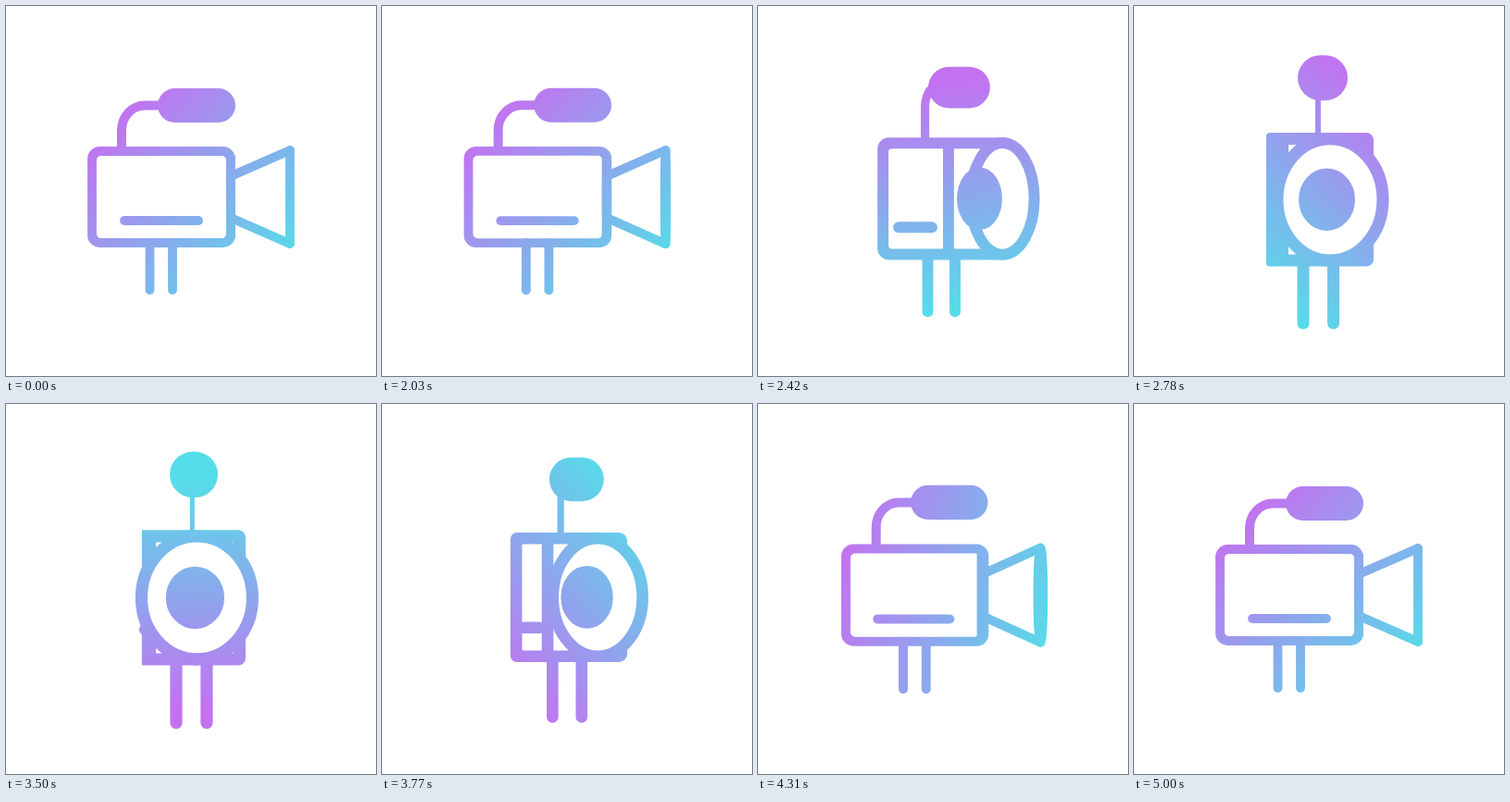
An HTML page with a canvas that plays this animation: 400 px wide and 400 px high, repeating every 5.06 s.

```html
<!DOCTYPE html>
<html lang="en">
<head>
<meta charset="utf-8">
<title>Camera turn</title>
<style>
html, body { margin: 0; width: 100%; height: 100%; overflow: hidden; background: #fff; }
canvas { display: block; width: 100vw; height: 100vh; }
</style>
</head>
<body>
<canvas id="stage" width="400" height="400"></canvas>
<script>
const ctx = document.getElementById('stage').getContext('2d');
const LOOP = 5060, START = 2030, END = 5000, STEP = 30;
const STROKE = 9.8, HALF = 49.5;

// [time, value] keys, joined by a smooth curve
const TURN = [[2000, 0], [2200, .24], [2420, .61], [2540, .756], [2780, .936], [3195, 1.09],
  [3500, .98], [3620, .912], [3980, .61], [4160, .21], [4330, .02], [4500, -.03], [4700, -.033], [5000, 0]];
const ANGLE = [[2000, 45], [2420, 82], [2780, 130], [3500, 272], [3980, 345], [5000, 405]];
const SHIFT = [[3500, 0], [3980, 2], [4400, 0]];

// Geometry at several amounts of turn, relative to the body centre
const POSES = [0, .61, .936, .98, 1.09];
const GEO = {
  back: [-107, -53.4, -38, -34.6, -34.6],
  front: [43, 4.9, -29.7, -33, -34],
  right: [43, 54, 39.5, 39, 39],
  leftR: [13, 10, 3, 0, 0],
  rightR: [13, 9, 6, 6, 6],
  innerR: [5, 3, 0, 0, 0],
  ringX: [107, 52.9, 9, 4.8, -2.5],
  ringRx: [0, 28.3, 42.9, 44.6, 45.2],
  ringRy: [50.5, 49.7, 49.4, 49.4, 49.4],
  discX: [43, 32.5, 6.4, 3.3, -1],
  discRx: [0, 15.2, 18, 18.6, 19],
  discRy: [22.5, 23, 20.5, 20.2, 20.2],
  footA: [-44.5, -13.6, -12.8, -11.9, -11.9],
  footB: [-20, 10.7, 11.7, 12.6, 12.6],
  stemX: [-75, -16, -.8, 1, 1],
  stemW: [10, 7.5, 4.5, 3.7, 3.7],
  bendX: [25, 9, 0, 0, 0],
  bendY: [27, 18, 0, 0, 0],
  micL: [-36, -13.1, -17.3, -17.1, -17.1],
  micR: [48, 41.9, 23.3, 21.6, 21.6],
  lineA: [-72, -39.4, -37, -36.8, -36],
  lineB: [8, -9.9, -32, -33, -34]
};

const clamp = (v, lo, hi) => Math.min(hi, Math.max(lo, v));

function spline(keys, t) {
  const n = keys.length - 1;
  if (t <= keys[0][0]) return keys[0][1];
  if (t >= keys[n][0]) return keys[n][1];
  let i = 0;
  while (t >= keys[i + 1][0]) i++;
  const slope = k => (keys[k + 1][1] - keys[k][1]) / (keys[k + 1][0] - keys[k][0]);
  const tangent = k => k === 0 || k === n ? 0 : (slope(k - 1) + slope(k)) / 2;
  const [t0, a] = keys[i], [t1, b] = keys[i + 1];
  const d = t1 - t0, u = (t - t0) / d, w = u * u * (3 - 2 * u);
  return a + (b - a) * w + d * u * (1 - u) * ((1 - u) * tangent(i) - u * tangent(i + 1));
}

function pose(p) {
  let i = 0;
  while (i < POSES.length - 2 && p > POSES[i + 1]) i++;
  const u = (p - POSES[i]) / (POSES[i + 1] - POSES[i]);
  const g = {};
  for (const name in GEO) {
    const v = GEO[name];
    g[name] = v[i] + (v[i + 1] - v[i]) * u;
  }
  if (p > 0 && p < .61) g.ringRx += 6.9 * Math.sin(Math.PI * p / .61);
  g.ringX = Math.min(g.ringX, 107);
  for (const name of ['ringRx', 'discRx']) g[name] = Math.max(.01, g[name]);
  for (const name of ['leftR', 'rightR', 'innerR', 'bendX', 'bendY']) g[name] = Math.max(0, g[name]);
  return g;
}

function line(x0, y0, x1, y1, cap = 'round') {
  ctx.lineCap = cap;
  ctx.beginPath();
  ctx.moveTo(x0, y0);
  ctx.lineTo(x1, y1);
  ctx.stroke();
}

function oval(x, rx, ry, fill) {
  ctx.beginPath();
  ctx.ellipse(x, 0, rx, ry, 0, 0, Math.PI * 2);
  ctx.closePath();
  ctx.fillStyle = fill;
  ctx.fill();
  ctx.stroke();
}

function gradient(deg, ox, oy, s) {
  const a = deg * Math.PI / 180, r = 125 / s;
  const x = (204 - ox) / s, y = (206 - oy) / s;
  const dx = r * Math.cos(a), dy = r * Math.sin(a);
  const g = ctx.createLinearGradient(x - dx, y - dy, x + dx, y + dy);
  g.addColorStop(0, '#c471f0');
  g.addColorStop(1, '#55dde9');
  return g;
}

function drawMic(g, paint) {
  const y = -99, r = 18.4;
  ctx.lineWidth = g.stemW;
  ctx.lineCap = 'butt';
  ctx.beginPath();
  ctx.moveTo(g.stemX, -HALF);
  ctx.lineTo(g.stemX, y + g.bendY);
  ctx.bezierCurveTo(g.stemX, y + g.bendY * .45, g.stemX + g.bendX * .45, y, g.stemX + g.bendX, y);
  ctx.lineTo(Math.max(g.micL + 5, g.stemX + g.bendX), y);
  ctx.stroke();
  ctx.fillStyle = paint;
  ctx.beginPath();
  ctx.roundRect(g.micL, y - r, g.micR - g.micL, 2 * r, r);
  ctx.fill();
}

function drawBody(g, paint) {
  const h = STROKE / 2, w = g.right - g.back;
  ctx.fillStyle = paint;
  ctx.beginPath();
  ctx.roundRect(g.back - h, -HALF - h, w + 2 * h, 2 * (HALF + h), [g.leftR, g.rightR, g.rightR, g.leftR]);
  ctx.roundRect(g.back + h, -HALF + h, w - 2 * h, 2 * (HALF - h), g.innerR);
  ctx.fill('evenodd');
  line(g.front, -45, g.front, 45, 'butt');
  line(g.lineA, 25.5, g.lineB, 25.5);
  for (const x of [g.footA, g.footB]) line(x, HALF, x, 100.5);
}

function drawLens(g, paint) {
  for (const side of [-1, 1]) line(g.discX, side * g.discRy, g.ringX, side * g.ringRy);
  oval(g.ringX, g.ringRx, g.ringRy, '#fff');
  oval(g.discX, g.discRx, g.discRy, paint);
}

function draw(t) {
  const p = spline(TURN, t), g = pose(p);
  const s = 1 + .352 * clamp(p, 0, 1);
  const ox = 200 + spline(SHIFT, t), oy = 206.5 + 8.5 * (s - 1);
  ctx.setTransform(1, 0, 0, 1, 0, 0);
  ctx.fillStyle = '#fff';
  ctx.fillRect(0, 0, 400, 400);
  ctx.setTransform(s, 0, 0, s, ox, oy);
  const paint = gradient(spline(ANGLE, t), ox, oy, s);
  ctx.strokeStyle = paint;
  ctx.lineJoin = 'round';
  drawMic(g, paint);
  ctx.lineWidth = STROKE;
  drawBody(g, paint);
  drawLens(g, paint);
}

function tick() {
  const t = performance.now() % LOOP;
  draw(t < START ? 0 : Math.min(END, START + STEP * Math.floor((t - START) / STEP)));
  requestAnimationFrame(tick);
}
tick();
</script>
</body>
</html>
```
